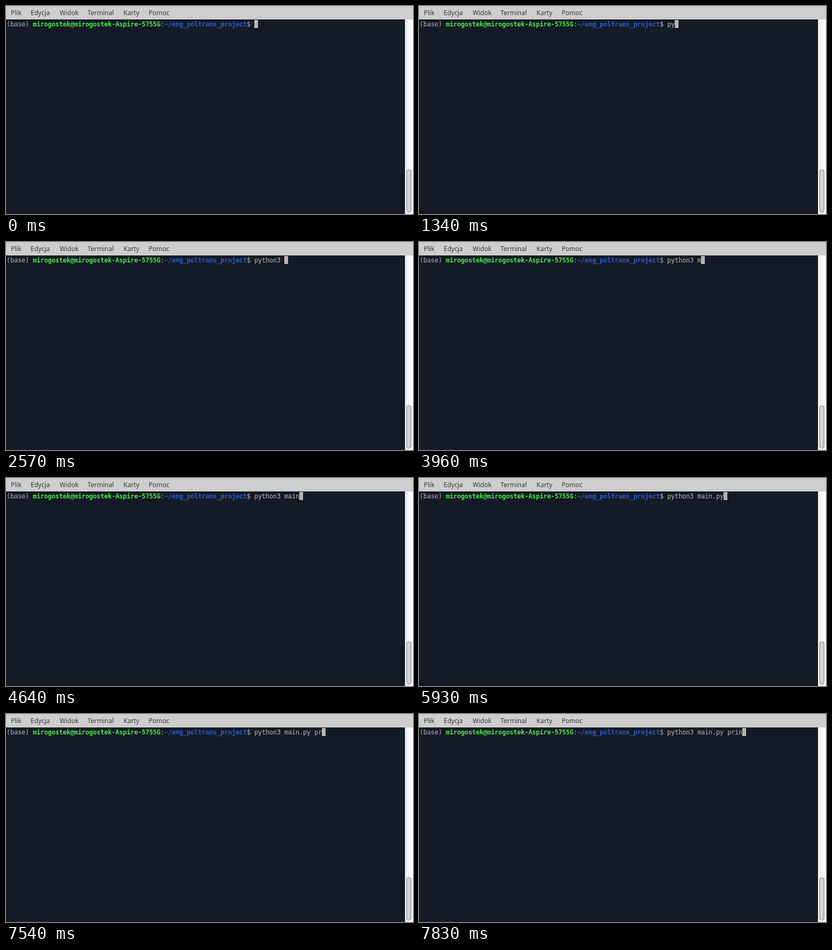
Write an HTML page that moves like this. It is 759 by 387 pixels and loops after 8 s.

```html
<!DOCTYPE html>
<html lang="pl">
<head>
<meta charset="utf-8">
<title>Terminal</title>
<style>
  html, body { margin: 0; width: 100%; height: 100%; overflow: hidden; }
  body { position: relative; background: #141a26; }
  .menu {
    position: absolute; left: 0; top: 0; width: 759px; height: 25px;
    background: #cecece; color: #3b3b3b;
    font: 12px/17px "Noto Sans", "Open Sans", sans-serif;
  }
  .menu span { position: absolute; top: 4px; white-space: pre; }
  .track {
    position: absolute; left: 744px; top: 25px; width: 15px; height: 362px;
    background: linear-gradient(90deg, #e9e9e9, #fff 90%);
  }
  .thumb {
    position: absolute; left: 3px; top: 279px; width: 9px; height: 80px;
    box-sizing: border-box; border: 1px solid #858585; border-radius: 4px;
    background: linear-gradient(90deg, #dadada, #cacaca);
  }
  /* one character per 7px cell */
  .line {
    position: absolute; left: 1px; top: 27px; white-space: pre; color: #b4b4b4;
    font: 12px/14px "DejaVu Sans Mono", monospace;
    letter-spacing: calc(7px - 1ch);
  }
  .line b { letter-spacing: calc(7px - 1ch); }
  .user { color: #4be447; }
  .path { color: #2a5bcb; }
  #cursor {
    position: absolute; left: 463px; top: 26px; width: 7px; height: 15px;
    background: #b8b4b3;
  }
</style>
</head>
<body>
<div class="menu">
  <span style="left:9px">Plik</span>
  <span style="left:46px">Edycja</span>
  <span style="left:100px">Widok</span>
  <span style="left:152px">Terminal</span>
  <span style="left:219px">Karty</span>
  <span style="left:266px">Pomoc</span>
</div>
<div class="track"><div class="thumb"></div></div>
<div class="line">(base) <b class="user">mirogostek@mirogostek-Aspire-5755G</b>:<b class="path">~/eng_poltrans_project</b>$ <span id="typed"></span></div>
<div id="cursor"></div>
<script>
  const LOOP = 8000, CELL = 7;
  const command = "python3 main.py prin";
  const keyTimes = [
    1050, 1340, 1480, 1560, 1740, 1900, 2080, 2570,
    3960, 4240, 4440, 4640, 5370, 5660, 5930, 6760,
    7330, 7540, 7660, 7830
  ];
  const typed = document.getElementById("typed");
  const cursor = document.getElementById("cursor");
  const start = performance.now();
  let shown = -1;

  function draw() {
    const t = Math.max(0, performance.now() - start) % LOOP;
    const count = keyTimes.filter(k => k <= t).length;
    if (count !== shown) {
      shown = count;
      typed.textContent = command.slice(0, count);
      cursor.style.transform = `translateX(${count * CELL}px)`;
    }
    requestAnimationFrame(draw);
  }
  draw();
</script>
</body>
</html>
```
